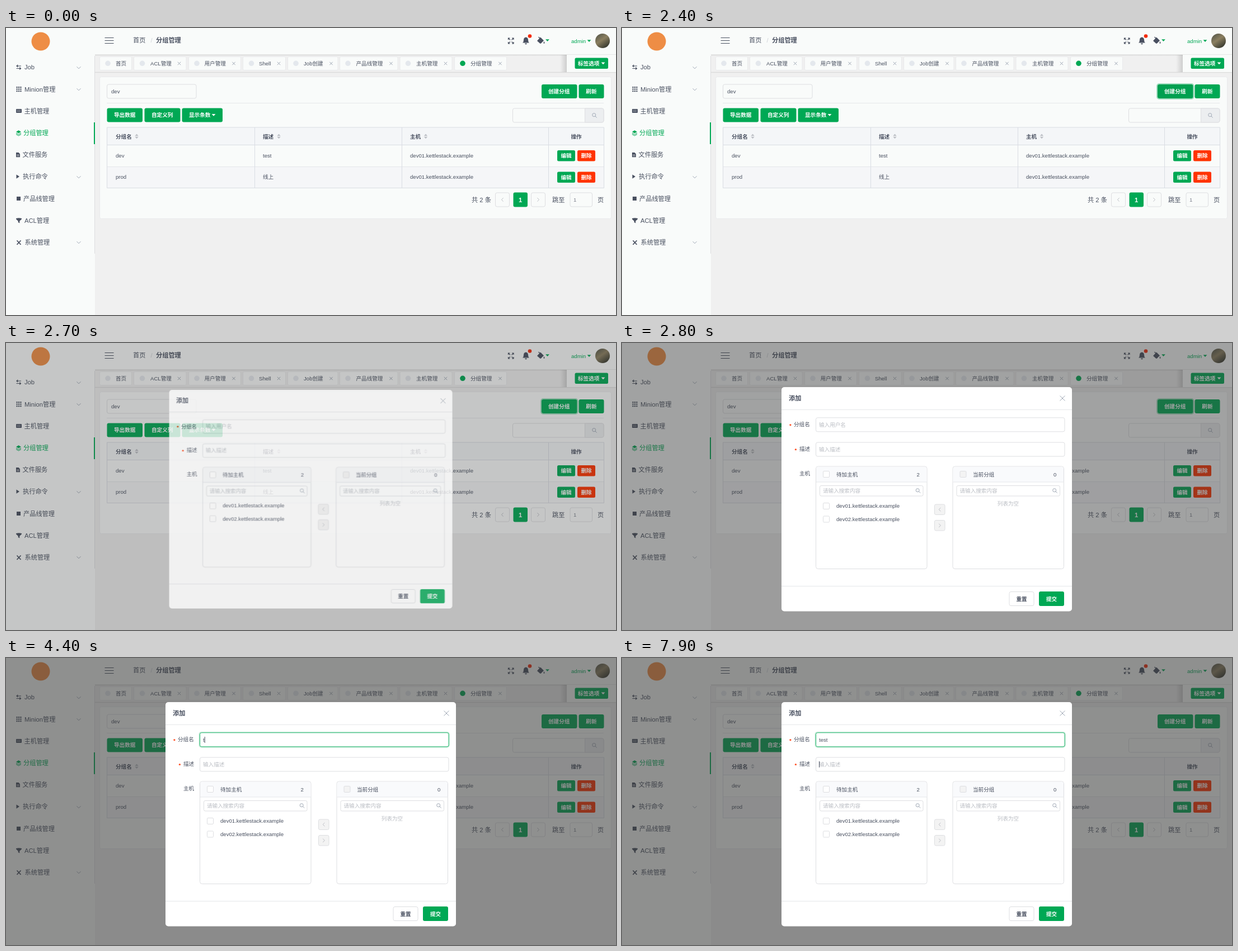
An HTML page for the animation above (8000 ms loop, 1090 px wide and 514 px high).

```html
<!DOCTYPE html>
<html lang="zh-CN">
<head>
<meta charset="utf-8">
<title>分组管理</title>
<style>
html, body { margin: 0; width: 100%; height: 100%; overflow: hidden; background: #f0f0f0; }
svg { display: block; }
text { font: 9.6px "Liberation Sans", Arial, "Noto Sans CJK SC", "Noto Sans CJK", sans-serif; fill: #495060; white-space: pre; }
.big { font-size: 11.2px; }
.b { font-weight: 700; }
.mid { text-anchor: middle; }
.w, .w text { fill: #fff; }
.hint { fill: #bbbec4; }
.green { fill: #00a854; }
.red { fill: #ff3300; }
.paper { fill: #f9fbfa; }
.box { fill: #fff; stroke: #dddee1; }
.pbox { fill: #f9fbfa; stroke: #dddee1; }
.tag { fill: #f9fbfa; stroke: #e9eaec; }
.off { fill: #f3f3f3; stroke: #dddee1; }
.rule { fill: none; stroke: #e5e7ea; }
.grid { fill: none; stroke: #d9dde3; }
.ico { fill: none; stroke: #495060; stroke-width: 1.2; }
.solid { fill: #495060; }
.thin { fill: none; stroke: #9ea7b4; stroke-width: 1; }
.pale { fill: none; stroke: #bbbec4; stroke-width: 1; }

/* one shared clock: 100 ms is 1.25% */
.a { animation: 8s step-end -20ms infinite; }
.create { animation-name: create; }
.ring { animation-name: ring; }
.mask { fill: #373737; animation-name: mask; }
.modal { transform-origin: 545px 279.5px; animation-name: modal; }
.empty { animation-name: empty; }
.filled { animation-name: filled; }
.field { animation-name: field; }
.glow { fill: none; stroke: #00a854; stroke-width: 1.8; animation-name: glow; }
.ph { animation-name: ph; }
.k1 { animation-name: k1; }
.k2 { animation-name: k2; }
.k3 { animation-name: k3; }
.k4 { animation-name: k4; }
.k5 { animation-name: k5; }
.k6 { animation-name: k6; }
.caret { fill: #495060; animation-name: caret; }

@keyframes create {
  0% { fill: #00a854; } 15% { fill: #11ae5f; } 16.25% { fill: #22b36b; }
  17.5% { fill: #33b976; } 30% { fill: #00a050; } 32.5%, 100% { fill: #00a854; }
}
@keyframes ring { 0% { opacity: 0; } 30% { opacity: .35; } 45% { opacity: .17; } 46.25%, 100% { opacity: 0; } }
@keyframes mask {
  0% { opacity: 0; } 32.5% { opacity: .1; } 33.75% { opacity: .27; }
  35% { opacity: .45; } 36.25%, 100% { opacity: .54; }
}
@keyframes modal {
  0% { opacity: 0; transform: scale(.9); } 32.5% { opacity: .32; transform: scale(.925); }
  33.75% { opacity: .78; transform: scale(.975); } 35%, 100% { opacity: 1; transform: none; }
}
@keyframes empty { 0% { opacity: 1; } 33.75%, 100% { opacity: 0; } }
@keyframes filled { 0% { opacity: 0; } 33.75%, 100% { opacity: 1; } }
@keyframes field { 0% { stroke: #dddee1; } 41.25% { stroke: #88cfab; } 42.5% { stroke: #33b976; } 45%, 100% { stroke: #26b56e; } }
@keyframes glow { 0% { opacity: 0; } 45% { opacity: .12; } 46.25%, 100% { opacity: .24; } }
@keyframes ph { 0% { opacity: 1; } 55%, 100% { opacity: 0; } }
@keyframes k1 { 0% { opacity: 0; } 55%, 100% { opacity: 1; } }
@keyframes k2 { 0% { opacity: 0; } 56.25%, 100% { opacity: 1; } }
@keyframes k3 { 0% { opacity: 0; } 60%, 100% { opacity: 1; } }
@keyframes k4 { 0% { opacity: 0; } 61.25% { opacity: 1; } 81.25%, 100% { opacity: 0; } }
@keyframes k5 { 0% { opacity: 0; } 63.75% { opacity: 1; } 76.25%, 100% { opacity: 0; } }
@keyframes k6 { 0% { opacity: 0; } 92.5%, 100% { opacity: 1; } }
@keyframes caret {
  0% { opacity: 0; transform: none; }
  45% { opacity: 1; transform: none; }
  50% { opacity: 0; transform: none; }
  55% { opacity: 1; transform: translateX(2.7px); }
  56.25% { opacity: 1; transform: translateX(8px); }
  60% { opacity: 1; transform: translateX(12.8px); }
  61.25% { opacity: 1; transform: translateX(18.1px); }
  63.75% { opacity: 1; transform: translateX(20.8px); }
  70% { opacity: 0; transform: translateX(20.8px); }
  76.25% { opacity: 1; transform: translateX(18.1px); }
  81.25% { opacity: 1; transform: translateX(12.8px); }
  87.5% { opacity: 0; transform: translateX(12.8px); }
  92.5% { opacity: 1; transform: translateX(15.5px); }
  98.75%, 100% { opacity: 1; transform: translateY(44px); }
}
</style>
</head>
<body>
<svg width="1090" height="514" viewBox="0 0 1090 514">
  <defs>
    <path id="chev" d="M-3.5-1.7L0 1.8 3.5-1.7"/>
    <path id="x" d="M-2.7-2.7l5.4 5.4M2.7-2.7l-5.4 5.4"/>
    <path id="down" d="M-3.4-1.8h6.8L0 2z"/>
    <path id="prev" d="M1.6-3.2L-1.6 0 1.6 3.2"/>
    <path id="next" d="M-1.6-3.2L1.6 0-1.6 3.2"/>
    <path id="sort" d="M-3.2-.8h6.4L0-4.2zM-3.2.8h6.4L0 4.2z" fill="#bbbec4"/>
    <g id="lens"><circle cx="-.8" cy="-.8" r="3"/><path d="M1.4 1.4L4.2 4.2"/></g>
    <g id="ops">
      <rect class="green" x="985" y="219" width="32" height="19.5" rx="2.5"/>
      <rect class="red" x="1021" y="219" width="32" height="19.5" rx="2.5"/>
      <text class="b w mid" y="232.3"><tspan x="1001">编辑</tspan><tspan x="1037">删除</tspan></text>
    </g>
    <g id="list">
      <rect class="box" x="346.5" y="221" width="198.5" height="183.5" rx="4"/>
      <path d="M347 249V225q0-3.5 3.5-3.5H541q3.5 0 3.5 3.5v24z" fill="#f9fafc"/>
      <path class="rule" d="M347 249h198"/>
      <rect class="box" x="353.5" y="255.5" width="184.5" height="18.5" rx="2.5"/>
      <text class="hint" x="359" y="268">请输入搜索内容</text>
      <use href="#lens" x="529" y="264.5" class="thin"/>
    </g>
    <g id="none">
      <rect class="off" x="359.5" y="229.5" width="11" height="11" rx="1.5"/>
      <text x="526.5" y="238.5">0</text>
      <text class="hint mid" x="445.5" y="291">列表为空</text>
    </g>
    <rect id="check" class="box" x="359.5" y="-5.5" width="11" height="11" rx="1.5"/>
    <linearGradient id="shade"><stop stop-color="#777" stop-opacity="0"/><stop offset="1" stop-color="#777" stop-opacity=".28"/></linearGradient>
    <linearGradient id="drop" x2="0" y2="1"><stop stop-color="#777" stop-opacity=".22"/><stop offset="1" stop-color="#777" stop-opacity="0"/></linearGradient>
    <linearGradient id="photo" x2=".7" y2="1"><stop stop-color="#4b4f45"/><stop offset=".5" stop-color="#8b7f60"/><stop offset="1" stop-color="#37392f"/></linearGradient>
  </defs>

  <rect width="1090" height="514" fill="#f0f0f0"/>

  <!-- sidebar -->
  <rect class="paper" width="159" height="514"/>
  <path d="M158.5 50V404" stroke="#dddee1"/>
  <rect class="green" x="157" y="169" width="2" height="39"/>
  <circle cx="62" cy="24" r="16.5" fill="#ee8d45"/>
  <text class="big">
    <tspan x="33" y="74">Job</tspan><tspan x="33" y="113.5">Minion管理</tspan><tspan x="32.5" y="152.8">主机管理</tspan><tspan class="green" x="31" y="192">分组管理</tspan><tspan x="29.5" y="231.2">文件服务</tspan><tspan x="30" y="270.4">执行命令</tspan><tspan x="31" y="309.6">产品线管理</tspan><tspan x="33" y="348.7">ACL管理</tspan><tspan x="33.5" y="388">系统管理</tspan>
  </text>
  <g class="thin">
    <use href="#chev" x="130" y="71"/><use href="#chev" x="130" y="110"/>
    <use href="#chev" x="130" y="267"/><use href="#chev" x="130" y="384"/>
  </g>
  <g class="ico">
    <path d="M27 68h-8m2.3-2L19 68l2.3 2M18.5 72.5h8m-2.3-2l2.3 2-2.3 2"/>
    <path d="M18.5 106.2h9M18.5 109.7h9M18.5 113.2h9" stroke-width="2.2" stroke-dasharray="2.2 1.2"/>
    <path d="M18.5 384.5m1 3.5l7-7.5M19.5 380.5l7 7.5" stroke-width="1.8"/>
  </g>
  <rect class="solid" x="18" y="145" width="10" height="7" rx="1"/>
  <path d="M19.5 147.2h7M19.5 149.5h7" stroke="#f9fbfa" stroke-width=".8" stroke-dasharray="1 .8"/>
  <path class="green" d="M18 186l4.5-2.7L27 186l-4.5 2.6z"/>
  <path d="M18 188.2l4.5 2.5 4.5-2.5M18 190.4l4.5 2.5 4.5-2.5" fill="none" stroke="#00a854"/>
  <path class="solid" d="M18 223h4.5l2.5 2.5v5.8h-7z"/>
  <path d="M19.3 227h4.4M19.3 229h4.4" stroke="#f9fbfa" stroke-width=".7"/>
  <path class="solid" d="M18.5 262.5l5.5 3.6-5.5 3.6z"/>
  <rect class="solid" x="19" y="302" width="7" height="7"/>
  <path class="solid" d="M18 341q5-1.5 10 0v1.2l-3.7 3.6v3.7l-2.6-1.5v-2.2L18 342.200z"/>

  <!-- top bar -->
  <rect class="paper" x="159" width="931" height="47.500"/>
  <path class="ico" d="M176.500 17.500h16M176.500 22.500h16M176.500 27.500h16" stroke-width="1.500"/>
  <text class="big" y="25.800"><tspan x="227">首页</tspan><tspan x="258.500" fill="#cfd2d7">/</tspan><tspan class="b" x="268">分组管理</tspan></text>
  <path class="ico" d="M897.500 21v-3h3M904 18h3v3M907 25v3h-3M900.500 28h-3v-3M898 18.500l3 3M906.500 18.500l-3 3M898 27.500l3-3M906.500 27.500l-3-3"/>
  <path class="solid" d="M923 26.500q2-1.500 2-5 0-4.500 4-5 4 .5 4 5 0 3.500 2 5zM927 27.500h4q-.5 2-2 2t-2-2z"/>
  <circle cx="936" cy="14.500" r="3.300" fill="#f32c0c"/>
  <path class="solid" d="M949 23l6-6.500 6 6-5 5q-1 .8-2 0zM961.500 24q2 3 0 4-2-1 0-4z"/>
  <path class="ico" d="M951.500 16l4 4"/>
  <use href="#down" x="967.500" y="22" class="green"/>
  <text class="green" x="1010" y="26.800">admin</text>
  <use href="#down" x="1042" y="23" class="green"/>
  <circle cx="1066" cy="23" r="13" fill="url(#photo)"/>

  <!-- open pages -->
  <rect x="159" y="47.500" width="931" height="3" fill="url(#drop)"/>
  <path d="M159 79.500h931" stroke="#dcdcdc" stroke-width="1.500"/>
  <g class="tag">
    <rect x="167.500" y="51.500" width="57" height="24" rx="2"/><rect x="228.500" y="51.500" width="93.500" height="24" rx="2"/>
    <rect x="326.500" y="51.500" width="93" height="24" rx="2"/><rect x="423.500" y="51.500" width="76" height="24" rx="2"/>
    <rect x="503.500" y="51.500" width="89.500" height="24" rx="2"/><rect x="596.500" y="51.500" width="103.500" height="24" rx="2"/>
    <rect x="704" y="51.500" width="93" height="24" rx="2"/><rect x="801.500" y="51.500" width="93" height="24" rx="2"/>
  </g>
  <g fill="#e4e8ed">
    <circle cx="182" cy="63.300" r="4.800"/><circle cx="243.500" cy="63.300" r="4.800"/><circle cx="341" cy="63.300" r="4.800"/><circle cx="438.500" cy="63.300" r="4.800"/>
    <circle cx="518" cy="63.300" r="4.800"/><circle cx="611" cy="63.300" r="4.800"/><circle cx="718.500" cy="63.300" r="4.800"/><circle class="green" cx="816" cy="63.300" r="4.800"/>
  </g>
  <text y="67"><tspan x="196">首页</tspan><tspan x="258">ACL管理</tspan><tspan x="354.500">用户管理</tspan><tspan x="452">Shell</tspan><tspan x="532">Job创建</tspan><tspan x="625.500">产品线管理</tspan><tspan x="733">主机管理</tspan><tspan x="830">分组管理</tspan></text>
  <g class="thin">
    <use href="#x" x="309.500" y="63.500"/><use href="#x" x="407" y="63.500"/><use href="#x" x="487.500" y="63.500"/><use href="#x" x="581" y="63.500"/>
    <use href="#x" x="688" y="63.500"/><use href="#x" x="785.500" y="63.500"/><use href="#x" x="883" y="63.500"/>
  </g>
  <rect x="990" y="48" width="12" height="31" fill="url(#shade)"/>
  <rect class="paper" x="1002" y="48" width="88" height="31"/>
  <rect class="green" x="1016.500" y="53.500" width="59.500" height="19.500" rx="2.500"/>
  <text class="b w" x="1022" y="66.800">标签选项</text>
  <use href="#down" x="1067" y="63.300" class="w"/>

  <!-- card -->
  <rect class="paper" x="167.500" y="87.500" width="914" height="254" rx="3" stroke="#e9eaec"/>
  <rect class="pbox" x="180.500" y="101" width="159.500" height="25" rx="3"/>
  <text x="188" y="117">dev</text>
  <path class="rule" d="M180 134.500h888"/>
  <rect class="a ring" x="956" y="100" width="65.500" height="27" rx="4" fill="none" stroke="#00a854" stroke-width="2"/>
  <rect class="a create" x="957" y="101" width="63.500" height="25" rx="3"/>
  <g class="green">
    <rect x="1023.500" y="101" width="45" height="25" rx="3"/>
    <rect x="180.500" y="143.500" width="63.500" height="25" rx="3"/>
    <rect x="247.500" y="143.500" width="64" height="25" rx="3"/>
    <rect x="314.500" y="143.500" width="72.500" height="25" rx="3"/>
  </g>
  <text class="b w" y="117"><tspan x="969">创建分组</tspan><tspan x="1036.300">刷新</tspan></text>
  <text class="b w" y="159.300"><tspan x="193">导出数据</tspan><tspan x="260">自定义列</tspan><tspan x="327">显示条数</tspan></text>
  <use href="#down" x="371" y="155.800" class="w"/>
  <rect class="pbox" x="905.500" y="144" width="162.500" height="25" rx="3"/>
  <path d="M1034.500 144h30.500q3 0 3 3v19q0 3-3 3h-30.500z" fill="#eceef0" stroke="#dddee1"/>
  <use href="#lens" x="1051.500" y="156.500" class="thin"/>

  <!-- table -->
  <rect x="180" y="178" width="888" height="32" fill="#f4f6f8"/>
  <rect x="180" y="248.500" width="888" height="38" fill="#f5f6f8"/>
  <path class="rule" d="M180 248.500h888"/>
  <path class="grid" d="M180.500 178h888v108.500h-888zM180.500 209.500h888M444.500 178v108.500M707.500 178v108.500M969.500 178v108.500"/>
  <text class="b" y="197.500"><tspan x="196">分组名</tspan><tspan x="459">描述</tspan><tspan x="722">主机</tspan><tspan x="1009.500">操作</tspan></text>
  <use href="#sort" x="233.500" y="194"/><use href="#sort" x="487.500" y="194"/><use href="#sort" x="750" y="194"/>
  <text y="232"><tspan x="196">dev</tspan><tspan x="459">test</tspan><tspan x="722">dev01.kettlestack.example</tspan></text>
  <text y="270.400"><tspan x="196">prod</tspan><tspan x="459">线上</tspan><tspan x="722">dev01.kettlestack.example</tspan></text>
  <use href="#ops"/><use href="#ops" y="38.500"/>

  <!-- pages -->
  <g class="pbox">
    <rect x="874.500" y="295" width="25" height="25" rx="3"/><rect x="938.500" y="295" width="25" height="25" rx="3"/>
    <rect x="1008" y="295" width="39.500" height="25" rx="3"/>
  </g>
  <rect class="green" x="906.500" y="294.500" width="25.500" height="26" rx="3"/>
  <use href="#prev" x="887" y="307.500" class="pale"/><use href="#next" x="951" y="307.500" class="pale"/>
  <text class="big" y="311.500"><tspan x="832">共 2 条</tspan><tspan class="b w" x="916">1</tspan><tspan x="976">跳至</tspan><tspan x="1057">页</tspan></text>
  <text x="1014" y="311" fill-opacity=".75">1</text>

  <rect class="a mask" width="1090" height="514"/>

  <!-- dialog -->
  <g class="a modal">
    <rect class="w" x="285" y="79" width="519" height="401.500" rx="5"/>
    <path class="rule" d="M285 119.500h519M285 435.500h519"/>
    <text class="big b" x="298" y="102.500">添加</text>
    <path class="thin" d="M782.500 94.500l9 9M791.500 94.500l-9 9" stroke-width="1.200"/>
    <text><tspan x="307" y="149.300">分组名</tspan><tspan x="317" y="193.300">描述</tspan><tspan x="317" y="237">主机</tspan><tspan class="red b" x="299" y="151">*</tspan><tspan class="red b" x="308.500" y="195">*</tspan></text>
    <rect class="a glow" x="345.300" y="132.800" width="446.700" height="27" rx="4"/>
    <rect class="a field" x="346.500" y="133.800" width="444.500" height="25" rx="3" fill="#fff"/>
    <rect class="box" x="346.500" y="178" width="444.500" height="25" rx="3"/>
    <text class="hint a ph" x="352" y="149.500">输入用户名</text>
    <text class="hint" x="352" y="193.500">输入描述</text>
    <g>
      <text class="a k1" x="352" y="149.500">t</text>
      <text class="a k2" x="354.700" y="149.500">e</text>
      <text class="a k3" x="360" y="149.500">s</text>
      <text class="a k4" x="364.800" y="149.500">e</text>
      <text class="a k5" x="370.200" y="149.500">t</text>
      <text class="a k6" x="364.800" y="149.500">t</text>
      <rect class="a caret" x="352" y="141" width="1" height="11"/>
    </g>

    <use href="#list"/><use href="#list" x="244.500"/>
    <use href="#none" x="244.500"/>
    <text y="238.500"><tspan x="383">待加主机</tspan><tspan x="627">当前分组</tspan></text>
    <g class="a empty"><use href="#none"/></g>
    <g class="a filled">
      <use href="#check" y="235"/><use href="#check" y="292"/><use href="#check" y="315.500"/>
      <text><tspan x="526.500" y="238.500">2</tspan><tspan x="383" y="295">dev01.kettlestack.example</tspan><tspan x="383" y="319">dev02.kettlestack.example</tspan></text>
    </g>
    <rect class="off" x="558.500" y="289" width="18.500" height="18.500" rx="2.500"/>
    <rect class="off" x="558.500" y="317.500" width="18.500" height="18.500" rx="2.500"/>
    <use href="#prev" x="567.800" y="298.200" class="pale"/><use href="#next" x="567.800" y="326.800" class="pale"/>

    <rect class="box" x="692" y="445.500" width="44" height="25" rx="3"/>
    <rect class="green" x="745" y="445" width="45" height="26" rx="3"/>
    <text class="b mid" y="461.500"><tspan x="714">重置</tspan><tspan class="w" x="767.500">提交</tspan></text>
  </g>
</svg>
</body>
</html>
```
